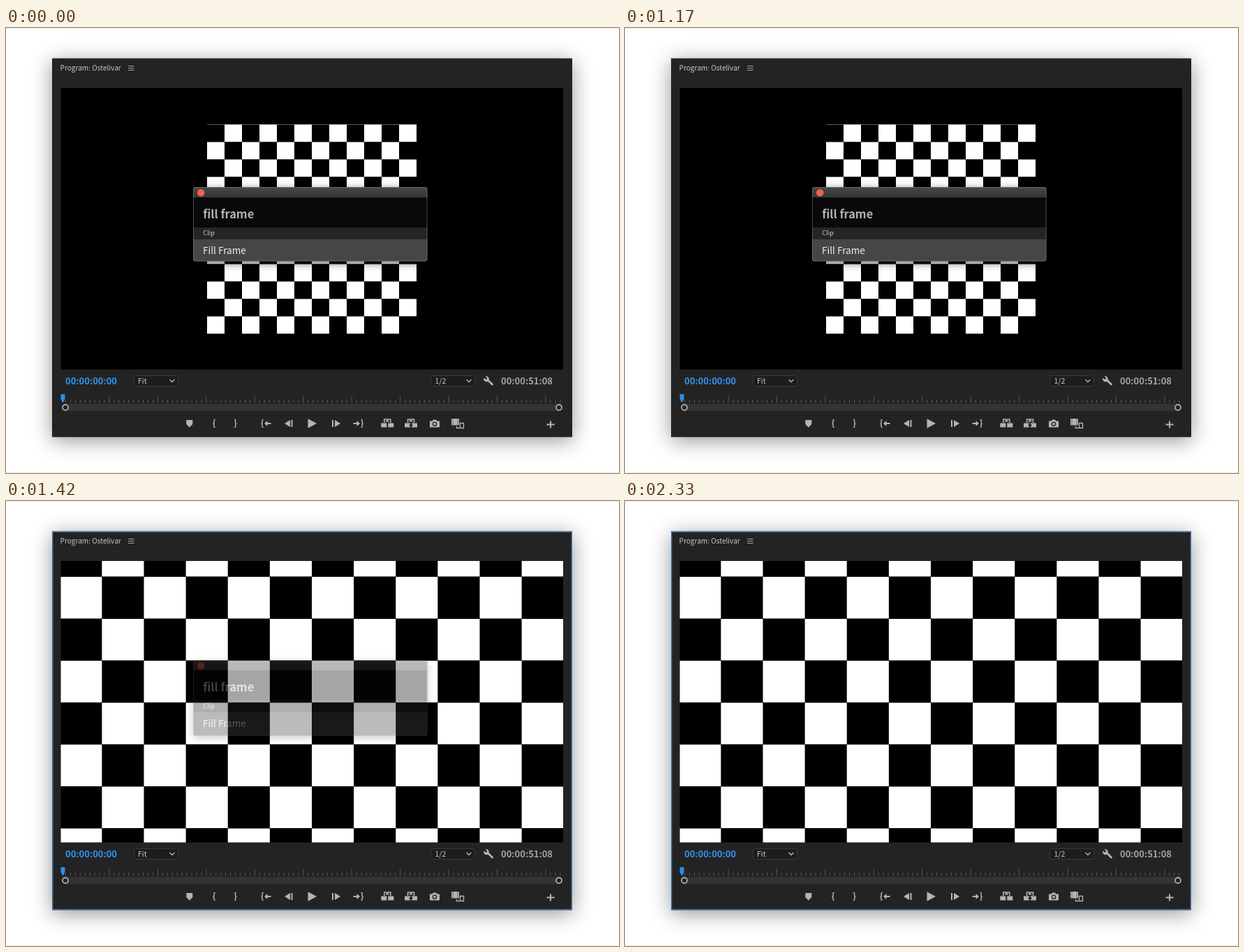
An HTML page for the animation above (3010 ms loop, 878x638 px).

```html
<!DOCTYPE html>
<html lang="en">
<head>
<meta charset="utf-8">
<title>Fill frame</title>
<style>
  html, body { margin: 0; width: 100%; height: 100%; overflow: hidden; background: #fff; }
  svg { display: block; position: absolute; left: 0; top: 0; }
  text { font-family: "Noto Sans CJK JP", "Noto Sans CJK SC", "Noto Sans CJK", "Open Sans", sans-serif; }
  #panel { filter: drop-shadow(0 5px 15px rgba(0, 0, 0, .42)); }
  #dialog { filter: drop-shadow(0 3px 6px rgba(0, 0, 0, .55)); }
  .time { font-size: 13px; font-weight: 700; }
  .small { font-size: 10.5px; fill: #c8c8c8; }
  .brace { font-size: 12.5px; font-weight: 700; text-anchor: middle; }
  .line { fill: none; stroke: #b4b4b4; }
</style>
</head>
<body>
<svg width="878" height="638" viewBox="0 0 878 638">
  <defs>
    <clipPath id="screen"><rect x="78.5" y="86" width="719.5" height="403.5"/></clipPath>
    <clipPath id="round"><rect id="roundBox" x="268" y="228" width="335.5" height="106.5" rx="3"/></clipPath>
    <linearGradient id="bar" x2="0" y2="1">
      <stop stop-color="#464949"/><stop offset="1" stop-color="#333535"/>
    </linearGradient>
    <g id="clips">
      <path d="M-9 0h8v6h-8zM1 0h8v6h-8z"/>
      <path class="line" d="M-4.5 -.5v-5h9v5" stroke-width="1.5"/>
    </g>
  </defs>
  <path d="M0 .5H878M0 637.5H878" stroke="#ececec"/>

  <rect id="panel" x="66" y="43.5" width="745" height="543" fill="#232323"/>
  <rect id="focus" x="66.75" y="44.25" width="743.5" height="541.5" fill="none" stroke="#4579b5" stroke-width="1.3"/>
  <text x="77.5" y="61" font-size="10.1" fill="#c8c8c8">Program: Ostelivar</text>
  <path d="M175 54.5h8.5M175 57.5h8.5M175 60.5h8.5" stroke="#a8a8a8"/>

  <rect x="78.5" y="86" width="719.5" height="403.5"/>
  <g clip-path="url(#screen)">
    <g id="board">
      <path d="M-150 -149.6H150" stroke="#777" stroke-width=".8"/>
      <path id="cells" fill="#fff"/>
    </g>
  </g>

  <text class="time" x="85" y="510.5" fill="#3196f3">00:00:00:00</text>
  <text class="time" x="709" y="510.5" fill="#a4a4a4">00:00:51:08</text>
  <g fill="#1d1d1d" stroke="#393939">
    <rect x="183.5" y="498.5" width="63" height="15" rx="2"/>
    <rect x="608.5" y="498.5" width="63" height="15" rx="2"/>
  </g>
  <text class="small" x="189" y="510">Fit</text>
  <text class="small" x="614.5" y="510">1/2</text>
  <path class="line" d="M234.5 504l3.5 3.5 3.5-3.5M659.5 504l3.5 3.5 3.5-3.5" stroke-width="1.3"/>
  <path d="M690 504.5l6.5 6.5" stroke="#b4b4b4" stroke-width="2.8" stroke-linecap="round"/>
  <path d="M684.5 501.5l3 2.5 1.8-1.8-2.5-3a4.2 4.2 0 0 1 4.6 5.9l-2.1 2.1a4.2 4.2 0 0 1-4.8-5.7z" fill="#b4b4b4"/>

  <path id="ticks" stroke="#585858"/>
  <rect x="81" y="539" width="716" height="10" rx="5" fill="#343434"/>
  <g fill="#232323" stroke="#a9a9a9" stroke-width="1.8">
    <circle cx="85" cy="544" r="4"/><circle cx="792" cy="544" r="4"/>
  </g>
  <path d="M78.5 525h6v7l-3 5.5-3-5.5z" fill="#2d8ceb"/>

  <g fill="#b4b4b4">
    <path d="M258.3 562h9v6l-4.5 4.8-4.5-4.8z"/>
    <g class="brace">
      <text x="298" y="571">{</text><text x="328.5" y="571">}</text>
      <text x="367" y="571">{</text><text x="510" y="571">}</text>
    </g>
    <path d="M370 567l4.5-4v3h5v2h-5v3zM507 567l-4.5-4v3h-5v2h5v3z"/>
    <path d="M399 567l8-5v10zM408.5 562h2v10h-2zM432.5 560.3l12.5 6.7-12.5 6.7zM467 562h2v10h-2zM479 567l-8-5v10z"/>
    <use href="#clips" x="546.3" y="566.5"/>
    <path d="M543.3 564.5l3-3.5 3 3.5z"/>
    <use href="#clips" x="580" y="566.5"/>
    <path d="M577 564.5l3-3.5 3 3.5z"/>
    <path d="M577 569.5l3-2.5v5zM583 569.5l-3-2.5v5z" fill="#232323"/>
    <path d="M607 563.5h3.5l1.5-2h4l1.5 2h3.5v9h-14z"/>
    <circle cx="614" cy="567.7" r="2.6" fill="none" stroke="#232323" stroke-width="1.4"/>
    <path d="M638 560h11v9.500h-11z"/>
    <path d="M640 560v9.500M647 560v9.500" stroke="#232323" stroke-dasharray="1 1"/>
    <path class="line" d="M645.5 571v2.500h4M650.5 566.500h5v7h-5z" stroke-width="1.3"/>
    <path d="M779 563.500h2v4h4.500v2h-4.500v4h-2v-4h-4.500v-2h4.500z"/>
  </g>

  <g id="dialog">
    <g clip-path="url(#round)">
      <path d="M268 228h336v15h-336z" fill="url(#bar)"/>
      <path d="M268 243h336v43h-336z" fill="#090909"/>
      <path d="M268 286h336v17h-336z" fill="#252525"/>
      <path d="M268 303h336v34h-336z" fill="#464646"/>
    </g>
    <rect id="edge" x="268.5" y="228.5" width="334.5" height="105.500" rx="3" fill="none" stroke="#858585" stroke-opacity=".55"/>
    <circle cx="279.2" cy="236.2" r="5.2" fill="#f0624f"/>
    <text x="282.3" y="273" font-size="16.4" font-weight="700" fill="#b2b2b2">fill frame</text>
    <text x="282.3" y="297.300" font-size="9.200" font-weight="500" fill="#cdcdcd">Clip</text>
    <text x="282" y="324" font-size="13.600" fill="#ececec">Fill Frame</text>
    <rect id="caret" x="356.300" y="255" width="1.200" height="23" fill="#dcdcdc"/>
  </g>
</svg>
<script>
  const $ = id => document.getElementById(id);
  const LOOP = 3010, FILL = 1250, FOCUS = 1330;

  // 12 x 12 checkerboard centred on the origin
  let cells = "", ticks = "";
  for (let row = 0; row < 12; row++)
    for (let col = 0; col < 12; col++)
      if ((row + col) % 2)
        cells += `M${col * 25 - 150} ${row * 25 - 149.5}h25v24.8h-25z`;
  $("cells").setAttribute("d", cells);

  // every tenth tick is a tall one
  for (let i = -9; i <= 93; i++)
    ticks += `M${(148 + i * 6.944).toFixed(2)} 537.5v${i % 10 ? -4.5 : -10}`;
  $("ticks").setAttribute("d", ticks);

  const dialogOpacity = t => t < FOCUS ? 1 : t < 1420 ? .87 : t < 1500 ? .36 : 0;

  function draw() {
    const t = performance.now() % LOOP;
    const filled = t >= FILL;
    $("board").setAttribute("transform", `translate(438 288) scale(${filled ? 2.405 : 1})`);
    $("roundBox").setAttribute("height", filled ? 108.5 : 106.5);
    $("edge").setAttribute("height", filled ? 107.5 : 105.5);
    $("caret").style.opacity = t >= 420 && t < 1000 ? 1 : 0;
    $("focus").style.opacity = t >= FOCUS ? 1 : 0;
    $("dialog").style.opacity = dialogOpacity(t);
    requestAnimationFrame(draw);
  }
  draw();
</script>
</body>
</html>
```
